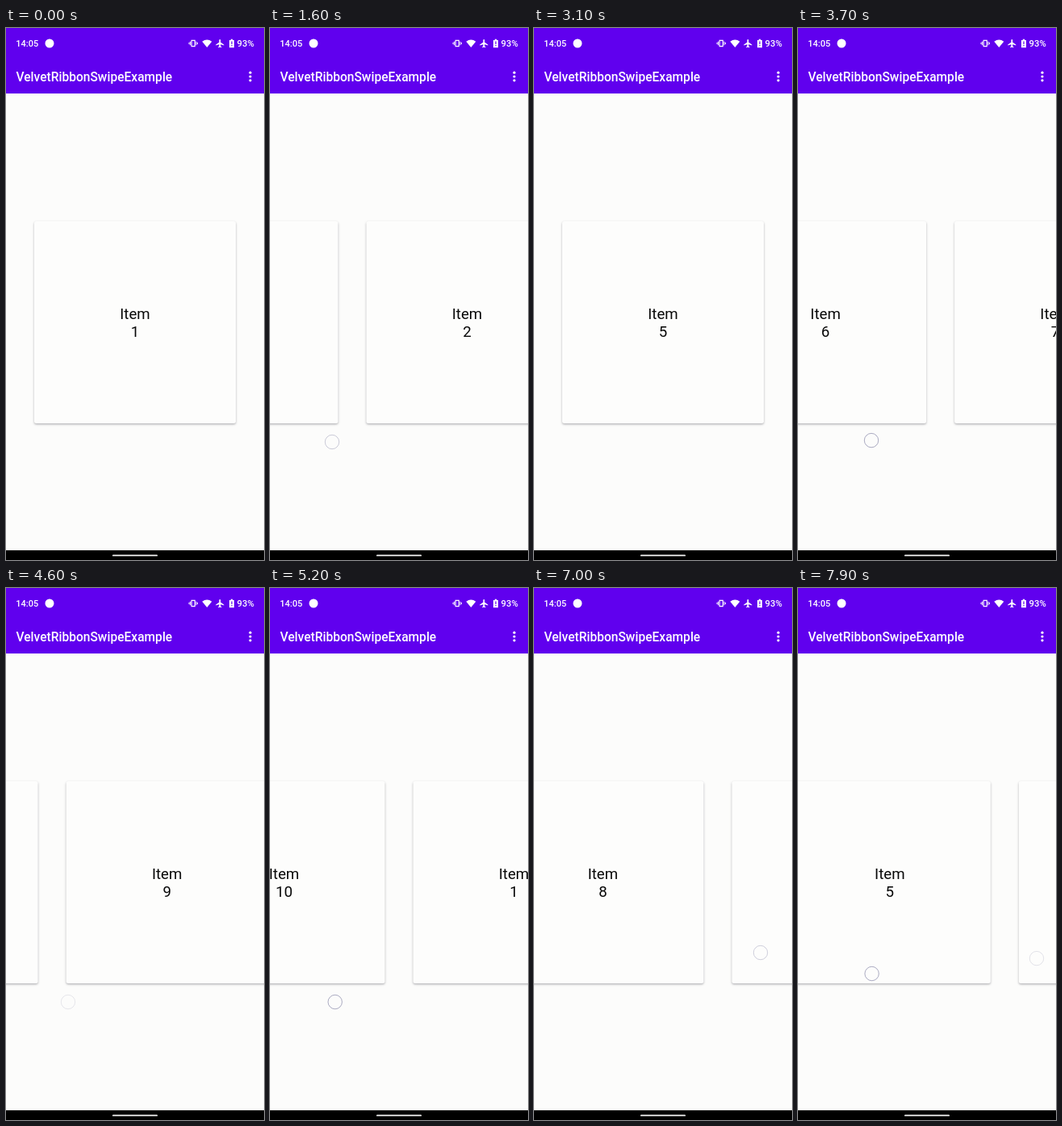
An HTML page with a canvas for the animation above (8 s loop, 320 by 658 pixels).

```html
<!DOCTYPE html>
<html lang="en">
<head>
<meta charset="utf-8">
<title>Card pager</title>
<style>
html, body { margin: 0; width: 100%; height: 100%; overflow: hidden; background: #000; }
canvas { display: block; width: 320px; height: 658px; }
</style>
</head>
<body>
<canvas id="stage"></canvas>
<script>
const W = 320, H = 658, LOOP = 8000, STEP = 100;
const ITEMS = 10, PITCH = 285, CARD = 250, TOP = 239;
const SLOP = 50, SLIDE = 300, FADE_AT = 200, FADE = 130;
const PURPLE = '#6000ee', PAPER = '#fcfcfb', CARD_FILL = '#fdfdfc';

// Touch-down times of the swipes to the next and to the previous card
const nextSwipes = [1350, 1810, 2270, 2690, 3105, 3514, 3910, 4306, 4655, 5000, 5350];
const prevSwipes = [5865, 6157, 6449, 6741, 7032, 7323, 7613, 7880];

const canvas = document.getElementById('stage');
const ctx = canvas.getContext('2d');
const dpr = window.devicePixelRatio || 1;
canvas.width = W * dpr;
canvas.height = H * dpr;

const clamp = v => Math.max(0, Math.min(1, v));

function slide(age) {
  const u = clamp((age - SLOP) / SLIDE);
  return (u + u * u * (3 - 2 * u)) / 2;
}

function pagePosition(t) {
  const total = list => list.reduce((sum, start) => sum + slide(t - start), 0);
  return 1 + total(nextSwipes) - total(prevSwipes);
}

function nextTouch(age) {
  const x = 215 - 138 * clamp(age / 205) ** 1.1;
  const slope = x > 132 ? 0.35 : 0.66;
  return [x, Math.min(512, 483 - (x - 132) * slope)];
}

function prevTouch(age, i) {
  const odd = i % 2;
  const end = odd ? 281 : 296;
  const x = 77 + (end - 77) * clamp(age / 230) ** 1.08;
  return [x, 477 - (odd ? 0.00072 : 0.00045) * (x - 91) ** 2];
}

function rect(x, y, w, h, color) {
  ctx.fillStyle = color;
  ctx.fillRect(x, y, w, h);
}

function dot(x, y, r, color) {
  ctx.fillStyle = color;
  ctx.beginPath();
  ctx.arc(x, y, r, 0, 7);
  ctx.fill();
}

function shape(d, x, y, stroke) {
  const path = new Path2D(d);
  ctx.save();
  ctx.translate(x, y);
  if (stroke) {
    ctx.strokeStyle = '#fff';
    ctx.lineWidth = stroke;
    ctx.stroke(path);
  } else {
    ctx.fillStyle = '#fff';
    ctx.fill(path);
  }
  ctx.restore();
}

function label(str, x, y, size, weight, color, align = 'left') {
  ctx.font = `${weight} ${size}px Roboto, sans-serif`;
  ctx.textAlign = align;
  ctx.fillStyle = color;
  ctx.fillText(str, x, y);
}

function drawCard(n, center) {
  const left = center - CARD / 2;
  const box = new Path2D();
  box.roundRect(left, TOP, CARD, CARD, 2.5);
  ctx.save();
  ctx.shadowColor = 'rgba(40,40,50,.36)';
  ctx.shadowBlur = 2.6 * dpr;
  ctx.shadowOffsetY = 1.3 * dpr;
  ctx.fillStyle = CARD_FILL;
  ctx.fill(box);
  ctx.restore();
  const number = ((n - 1) % ITEMS + ITEMS) % ITEMS + 1;
  label('Item', center, 360, 18.7, 400, '#080808', 'center');
  label(number, center, 382, 18.7, 400, '#080808', 'center');
}

function drawTouches(t, starts, place) {
  starts.forEach((start, i) => {
    const age = t - start;
    if (age < 0 || age > FADE_AT + FADE) return;
    const [x, y] = place(age, i);
    ctx.globalAlpha = 1 - clamp((age - FADE_AT) / FADE);
    ctx.strokeStyle = 'rgba(90,90,135,.5)';
    ctx.lineWidth = 1;
    ctx.beginPath();
    ctx.arc(x, y, 8.7, 0, 7);
    ctx.stroke();
    ctx.globalAlpha = 1;
  });
}

function drawBars() {
  rect(0, 0, W, 81, PURPLE);
  label('14:05', 12.3, 23, 11, 500, '#fff');
  dot(54, 19, 5.5, '#fff');

  // Vibrate
  shape('M-2 -3.7H2V3.7H-2Z', 232.2, 19, 1.2);
  shape('M-3.7 -2.3V2.3M3.7 -2.3V2.3M-5.2 -1.2V1.2M5.2 -1.2V1.2', 232.2, 19, 1);
  // Wi-Fi
  shape('M0 5L-6 -2.3Q0 -6.8 6 -2.3Z', 249.3, 19);
  // Plane
  shape('M-.9 -4.2Q0 -6 .9 -4.2V-1.2L5 1.4V2.5L.9 1.2V3.6L2.1 4.5V5.3L0 4.7L-2.1 5.3V4.5L-.9 3.6V1.2L-5 2.5V1.4L-.9 -1.2Z', 265.3, 19);
  // Battery
  shape('M-3 -4H-1.2V-5.2H1.2V-4H3V5.2H-3Z', 280, 19);
  rect(279.4, 16.5, 1.2, 3.5, PURPLE);
  rect(279.4, 21, 1.2, 1.3, PURPLE);
  label('93%', 307.7, 23, 11.3, 500, '#fff', 'right');

  label('VelvetRibbonSwipeExample', 12.5, 66, 15.57, 500, '#fff');
  for (const y of [55.2, 60, 64.8]) dot(303, y, 1.6, '#fff');

  rect(0, 646, W, 12, '#000');
  ctx.fillStyle = '#f6f6f6';
  ctx.beginPath();
  ctx.roundRect(132, 651.5, 56, 1.8, 0.9);
  ctx.fill();
}

function draw(t) {
  ctx.setTransform(dpr, 0, 0, dpr, 0, 0);
  rect(0, 0, W, H, PAPER);
  const page = pagePosition(t);
  const near = Math.round(page);
  for (let n = near - 1; n <= near + 1; n++) {
    const center = W / 2 + (n - page) * PITCH;
    if (Math.abs(center - W / 2) < (W + CARD) / 2) drawCard(n, center);
  }
  drawTouches(t, nextSwipes, nextTouch);
  drawTouches(t, prevSwipes, prevTouch);
  drawBars();
}

const begin = performance.now();
function tick() {
  const t = (performance.now() - begin) % LOOP;
  draw(Math.floor(t / STEP) * STEP);
  requestAnimationFrame(tick);
}
tick();
</script>
</body>
</html>
```
